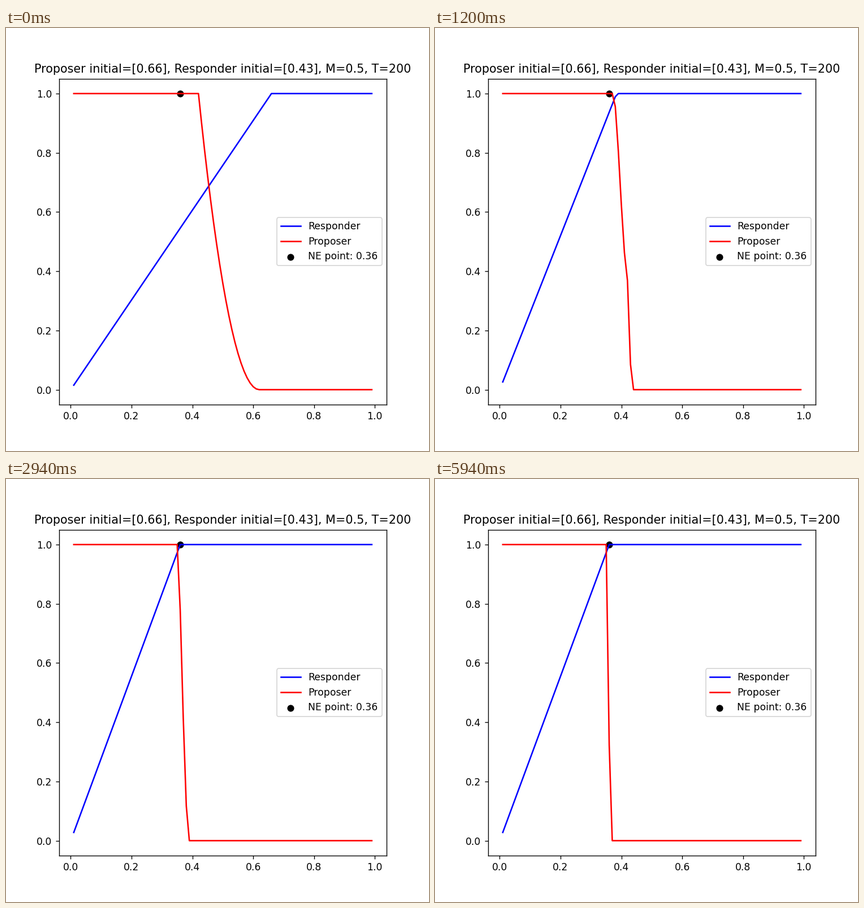
A matplotlib script that plays this animation: 748 px wide and 748 px high, repeating every 5.97 s.

```python
import numpy as np
import matplotlib.pyplot as plt
from matplotlib.animation import FuncAnimation

SIZE = 748
STEPS = 199
RATE = 0.5
OFFER, DEMAND = 66, 43  # opening moves, in hundredths
NASH = 0.36

ticks = np.arange(1, 100)
x = ticks / 100


def project(v):
    """Euclidean projection onto the probability simplex."""
    u = np.sort(v)[::-1]
    shift = (np.cumsum(u) - 1) / np.arange(1, len(u) + 1)
    return np.maximum(v - shift[u > shift][-1], 0)


def play():
    """Ultimatum game: both sides follow the regularised leader."""
    offer = (ticks == OFFER).astype(float)
    demand = (ticks == DEMAND).astype(float)
    offer_score = np.zeros(len(x))
    demand_score = np.zeros(len(x))
    for _ in range(STEPS):
        offer_score += (1 - x) * np.cumsum(demand)
        demand_score += np.cumsum((x * offer)[::-1])[::-1]
        offer = project(RATE * offer_score)
        demand = project(RATE * demand_score)
        yield np.cumsum(demand), 1 - np.cumsum(offer)


curves = list(play())

fig, ax = plt.subplots(figsize=(6, 6), dpi=SIZE / 6)
responder, = ax.plot(x, curves[0][0], color="blue", label="Responder")
proposer, = ax.plot(x, curves[0][1], color="red", label="Proposer")
ax.scatter([NASH], [1], color="black", label=f"NE point: {NASH}")
ax.set_xlim(-0.039, 1.039)
ax.set_ylim(-0.05, 1.05)
ax.set_title(f"Proposer initial=[{OFFER / 100}], Responder initial=[{DEMAND / 100}], "
             f"M={RATE}, T={STEPS + 1}")
ax.legend(loc="center right")


def update(i):
    accept, tail = curves[i]
    responder.set_ydata(accept)
    proposer.set_ydata(tail)
    return responder, proposer


anim = FuncAnimation(fig, update, frames=STEPS, interval=30, repeat=True)
plt.show()
```
